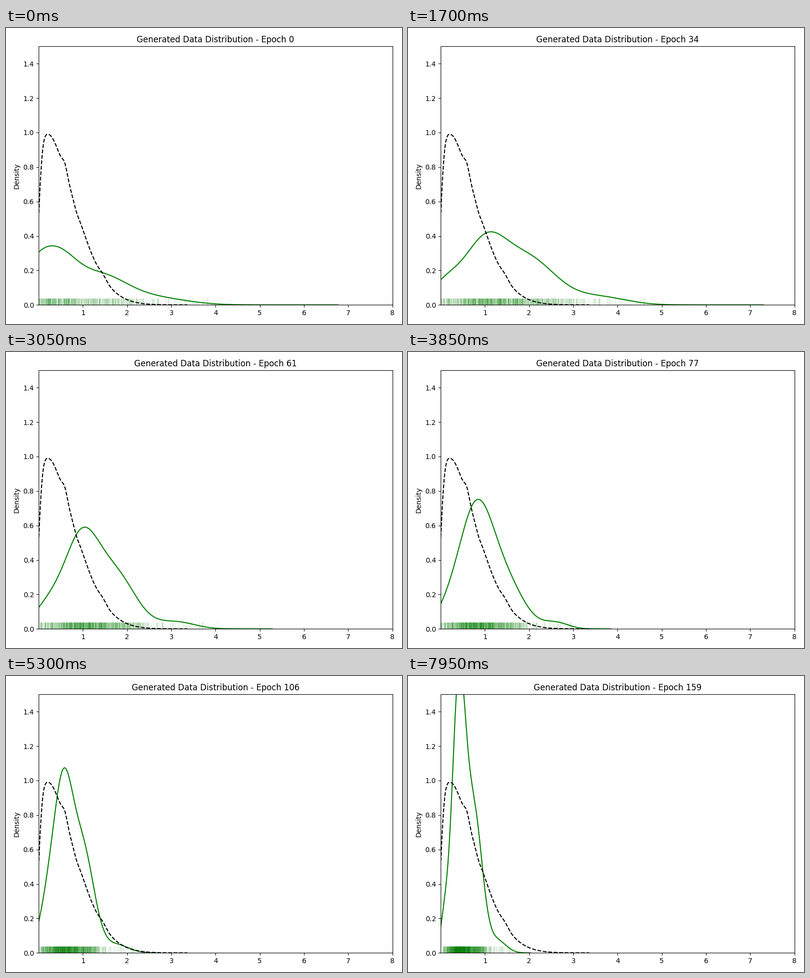
These frames come from a looping animation (800 px wide and 600 px high, 8000 ms). A matplotlib script:

```python
import numpy as np
import matplotlib.pyplot as plt
from matplotlib.animation import FuncAnimation
from matplotlib.collections import LineCollection

FRAMES, INTERVAL = 160, 50
SAMPLES = 1000
RUG_HEIGHT = 0.0375

plt.rcParams["font.family"] = "DejaVu Sans"

# Key poses: epoch, right end, then left, main, shoulder and tail bumps,
# each as height, centre, width
POSES = np.array([
    [0, 6.77, .18, -.1, .36, .22, .45, .4, .17, 1.35, .62, .039, 2.65, .7],
    [34, 7.3, .115, .1, .36, .32, .98, .46, .27, 1.95, .64, .045, 3.6, .6],
    [61, 5.28, .12, .2, .33, .51, .96, .39, .3, 1.75, .45, .041, 3.1, .42],
    [77, 3.85, .092, .2, .32, .68, .81, .38, .24, 1.5, .4, .037, 2.6, .28],
    [106, 2.65, .22, .18, .19, .93, .55, .22, .565, 1.01, .25, .048, 1.75, .28],
    [135, 2.23, .15, .08, .16, 1.19, .415, .175, .72, .78, .22, .064, 1.4, .2],
    [159, 2.03, .165, .08, .09, 1.5, .405, .15, .8, .75, .19, .07, 1.28, .2],
])


def bumps(x, params):
    """Sum of Gaussian bumps."""
    return sum(h * np.exp(-((x - c) / w) ** 2 / 2)
               for h, c, w in np.reshape(params, (-1, 3)))


def real_density(x):
    """Half-normal density with a soft left edge and slight ripples."""
    edge = (1 + np.tanh(10.25 * x)) / 2
    ripples = [.045, .59, .055, -.016, .19, .07, -.017, .85, .06, .017, 1.45, .08]
    return edge * bumps(x, [1.06, 0, .75]) + bumps(x, ripples)


def pose(epoch):
    end, *params = [np.interp(epoch, POSES[:, 0], col) for col in POSES.T[1:]]
    x = np.linspace(0, end, 500)
    return x, bumps(x, params)


def sample(x, y):
    """Place the fixed ranks by the mass to the right of each x."""
    steps = (y[1:] + y[:-1]) / 2 * np.diff(x)
    mass = np.append(0, np.cumsum(steps[::-1]))
    return np.interp(ranks[ranks < mass[-1]], mass, x[::-1])


ranks = np.random.default_rng(4).random(SAMPLES)

fig, ax = plt.subplots(figsize=(8, 6), dpi=100)
ax.set(xlim=(0.001, 8), ylim=(0, 1.5), ylabel="Density")
title = ax.set_title("Generated Data Distribution - Epoch 0")
fig.tight_layout()

rug = LineCollection([], colors="green", linewidths=1, alpha=0.1)
ax.add_collection(rug, autolim=False)
curve, = ax.plot([], [], color="green", lw=1.5)
grid = np.linspace(-.25, 3.36, 500)
ax.plot(grid, real_density(grid), color="black", ls="--", lw=1.5)


def update(epoch):
    x, y = pose(epoch)
    curve.set_data(x, y)
    rug.set_segments([[(v, 0), (v, RUG_HEIGHT)] for v in sample(x, y)])
    title.set_text(f"Generated Data Distribution - Epoch {epoch}")
    return curve, rug, title


anim = FuncAnimation(fig, update, frames=FRAMES, init_func=lambda: update(0),
                     interval=INTERVAL, repeat=True, repeat_delay=0)
plt.show()
```
